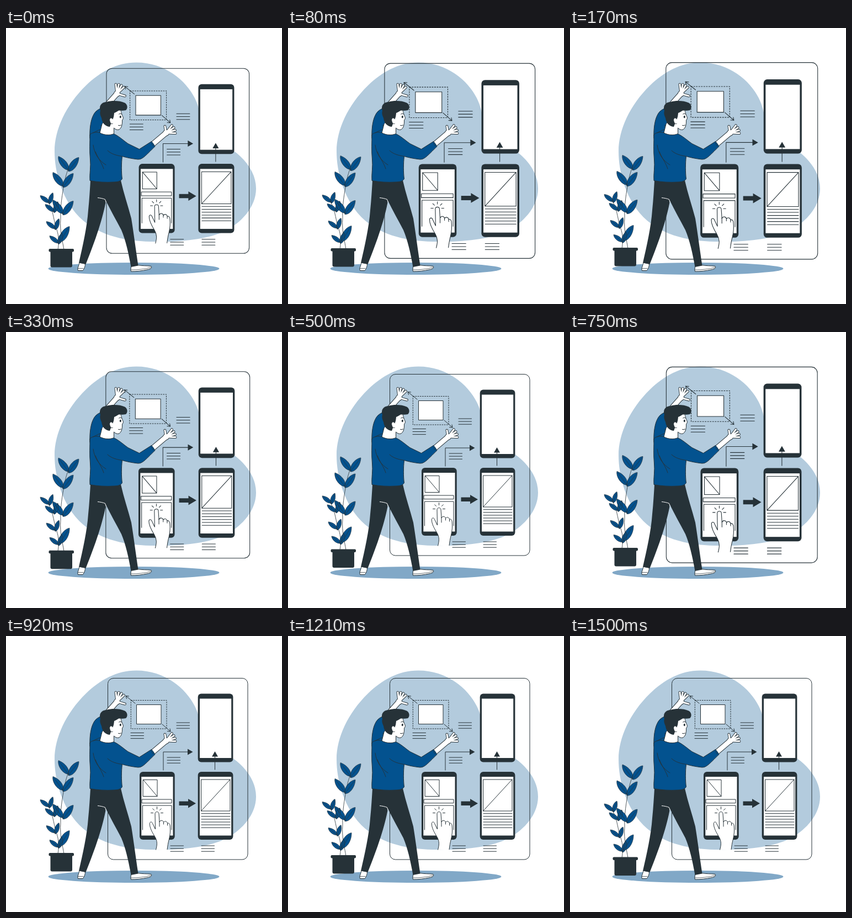
Animation, 500 px wide and 500 px high, one loop 1540 ms. Source, as an HTML page:

```html
<!DOCTYPE html>
<html lang="en">
<head>
<meta charset="utf-8">
<style>
  html, body { margin: 0; height: 100%; overflow: hidden; background: #fff; }
  svg { display: block; width: 100vw; height: 100vh; }
  .line { fill: none; stroke: #263238; stroke-linecap: round; stroke-linejoin: round; }
  .white { fill: #fff; stroke: #263238; stroke-linejoin: round; }
  .blue { fill: #03528f; stroke: #263238; stroke-linejoin: round; }
  .dark { fill: #263238; }
  .screen { fill: #fff; }
</style>
</head>
<body>
<svg viewBox="0 0 500 500">
  <path fill="#b3cbdd" d="M236 62.5C288 62.5 326 95 342 127C356 155 351 180 369 197C385 210 405 214 424 232C443 250 453 270 453 291C453 325 425 355 392 370C360 384 310 388 262 387C213 386 160 375 126 335C101 304 88 262 88 223C88 185 108 140 145 104C170 80 200 62.5 236 62.5Z"/>
  <ellipse cx="231.5" cy="436" rx="155" ry="11" fill="#81a8c7"/>

  <g id="board">
    <rect class="line" x="184.5" y="76.5" width="253.5" height="328.5" rx="10"/>
    <rect class="line" x="226.3" y="116.5" width="64.7" height="51.5" stroke-dasharray="2.6 1.6" style="stroke-linecap:butt"/>
    <rect class="white" x="236.5" y="124.5" width="44.5" height="35"/>
    <path class="line" d="M234 122L217 108.5M218.5 113.5L217 108.5L222.5 109M283 160L298 173M297 168L298 173L292.5 172.5"/>
    <path class="line" id="captions"/>
    <g id="phones"></g>
    <path class="line" d="M285 243V210H330M378.5 242V217"/>
    <path class="dark" d="M329 204.5L338.5 210L329 215.5ZM373 218.5L378.5 209L384 218.5ZM313.5 299.5H330V295L344 303.2L330 311.5V307H313.5Z"/>
    <path class="line" d="M248.5 260.5H274V290.5H248.5ZL274 290.5M246.5 296H300V302.7H246.5ZM247.5 351V307H300V351"/>
    <path class="line" d="M353.5 260H406V317H353.5ZL406 260M353.5 317L406 260" style="display:none"/>
    <path class="line" d="M353.5 317V260H406V317H353.5L406 260"/>
    <path class="line" id="rays"/>
    <path class="white" d="M271.5 387.5C274 378 274.5 372 270 364C265 356 260 347 260.3 339.5C261 336 264.3 336 265.5 339.5L270.5 350L270 322C270 317.3 277 317.3 277 322L278 337C280 332.7 285 333.7 285.5 337.5C288 334.5 292 335.5 292.5 339.5C295 338 297 340.5 297.2 344C298 352 297.5 360 295.5 368C293.5 375 293 380 292 387"/>
    <path class="line" d="M278 345V336M285.5 341V337M292.5 343V339.5"/>
  </g>

  <g id="plant">
    <path class="line" stroke-width=".8" d="M105 402C103 388 97 370 99 345C98 325 102 300 106 280C108 268 111 261 113 254M94 402C97 385 95 373 90 360C86 345 85 330 76 314"/>
    <path class="blue" id="leaves" stroke-width=".7"/>
    <rect class="dark" x="77.5" y="400.5" width="45.5" height="5.5" rx="2"/>
    <rect class="dark" x="80.5" y="402" width="39.5" height="32" rx="3"/>
  </g>

  <g id="man">
    <g id="hands"></g>
    <path class="blue" d="M152 200C151 180 154 160 163 151C167 147.5 171 145.5 174 145L180 195Z"/>
    <path class="white" d="M133 425L143.500 427C143.500 432 142 436 139 439.500H130.500C129 435 132 431 133 425ZM226.500 431L239 429.500C246 431 255 430.500 263 431.500C265 434.500 262 437 255 438C247 440 236 441 226.500 441C225 437 227 435 226.500 431Z"/>
    <path class="line" d="M130 435.500H140M226 438C238 438 252 437 263 433.500" stroke-width=".7"/>
    <path class="dark" d="M153 276H208C213 299 221 322 227 345C231 370 235 400 239.500 430.500L226.500 433C222 408 217 385 209 366C200 349 190 331 181 313C176 343 162 385 144.500 428L132 425.500C139 395 147 360 149 330C151 310 152 292 153 276Z"/>
    <path d="M166 307.500C171 308 176 309 179.500 310.500L181.500 316" fill="none" stroke="#fff"/>
    <path class="blue" d="M152 193C158 188 165 188 171 190C178 194 188 194 195 191.500C205 196 213 204 221 209.500L241.500 219.500L263.500 205.500C266 208 268 211 270 214.500C262 222 254 231 247.500 235.500Q243 238.500 239 238C229 237 219 235 210.500 232.500C209 245 209 262 210.500 273.500Q207 279 196 279C181 280 165 279 152 276.500C151 265 154 250 152.500 238C151 222 152 207 152 193Z"/>
    <path class="line" d="M158 212C160 228 168 240 181 248M162 224C167 237 173 243 177 255M184 222C190 228 200 231 210.500 232.500M263 208L267 214M172 176L174 186M158 190C165 186 169 184 173 184" stroke-width=".9"/>
    <path class="white" d="M184 158L207.500 147C209 154 210 157 212.300 162C213 164.500 211 166 210.500 167C211 175 209 182.500 204 184.300C200 185 197.500 183 195.500 181V191.500C188 195 178 194 170 190L174 174Z"/>
    <path class="dark" d="M171 150C168 142 172 134.500 182 134C192 131 206 131.500 215 135.500C220.500 138.500 221 146 217 149C212 150 208 149.500 204 149.500C201 152 198 153 196 154C195.500 159 195 163 192.500 167L188 179C180 178.500 174 172 173 163C170 157 170 153 171 150Z"/>
    <path class="white" d="M193 164.500C190 161 186.500 164 188 169C189 173 191.500 174.500 193.500 173" stroke="none"/>
    <path class="line" d="M204.500 156Q207 153.500 209.500 156M203.500 176.500Q206 177.500 208.500 176"/>
    <ellipse class="dark" cx="207.3" cy="161" rx="1.5" ry="2.2"/>
  </g>
</svg>
<script>
const PERIOD = 1540, CYCLE = 1500, STEP = 1000 / 24, LEAD = 30;
const $ = id => document.getElementById(id);
const setPath = (id, d) => $(id).setAttribute('d', d);
const repeat = (count, make) => Array.from({ length: count }, (_, i) => make(i)).join('');

const lines = (x, y, width, count) => repeat(count, i => `M${x} ${y + i * 5.1}h${width}`);

// Straight line at an angle in degrees, between two distances from a centre.
function spoke(x, y, angle, from, to) {
  const a = angle * Math.PI / 180, c = Math.cos(a), s = Math.sin(a);
  return `M${x + c * from} ${y + s * from}L${x + c * to} ${y + s * to}`;
}

const phone = (x, y, screenHeight) => `
  <rect class="dark" x="${x}" y="${y}" width="63.7" height="${screenHeight + 16.5}" rx="6"/>
  <rect class="screen" x="${x + 3.3}" y="${y + 9}" width="57.2" height="${screenHeight}"/>`;

// Forearm, palm, four fanned fingers and a thumb; a wide dark pass outlines the white one.
function hand(x, y, elbow, fan, thumb, reach) {
  const fingers = repeat(4, i => spoke(x, y, fan + i * 18, 0, 17)) + spoke(x, y, thumb, 0, reach);
  const pass = (color, edge) => [[fingers, 3], [`M${x} ${y}h0`, 10], [`M${x} ${y}L${elbow}`, 8.5]]
    .map(([d, w]) => `<path class="line" style="stroke:${color}" stroke-width="${w + edge}" d="${d}"/>`).join('');
  return pass('#263238', 1.8) + pass('#fff', 0);
}

// A pointed leaf with a vein; dx, dy lead from the stem to the tip.
function leaf(x, y, dx, dy) {
  const at = (along, across) => `${x + dx * along - dy * across} ${y + dy * along + dx * across}`;
  return `M${x} ${y}C${at(.15, .25)} ${at(.65, .24)} ${at(1, 0)}C${at(.8, -.22)} ${at(.25, -.27)} ${x} ${y}L${at(.9, 0)}`;
}
const pairs = (nodes, left, right) =>
  nodes.map(([x, y]) => leaf(x, y, ...left) + leaf(x, y + 2, ...right)).join('');

setPath('captions', [[226, 175.4], [309, 157], [292, 220], [298, 380], [354, 380]]
  .map(([x, y]) => lines(x, y, 23.5, 3)).join(''));
setPath('rays', repeat(5, i => spoke(273.5, 320.5, 180 + i * 45, 7, 11)));
$('phones').innerHTML = phone(347.7, 104.5, 107.5) + phone(242, 246, 106.5) +
  phone(347.7, 246, 106.5) + `<path class="line" d="${lines(354, 321.7, 52, 6)}"/>`;
setPath('leaves',
  pairs([[78, 317], [87, 333], [89, 364], [95, 390]], [-16, -13], [7, -20]) +
  pairs([[113, 258], [103, 287], [103, 337]], [-18, -25], [19, -25]) +
  leaf(97, 388, 18, -28));
$('hands').innerHTML = hand(201, 119, '177 146', -97, 16, 15) + hand(290, 190, '264 212', -52, -100, 12);

// Two linear beats of 10%, then a rest.
const peak = (p, start, top, end) =>
  Math.max(0, Math.min((p - start) / (top - start), (end - p) / (end - top)));
const beat = p => 1 + .1 * (peak(p, 0, .1, .3) + peak(p, .4, .5, .6));

function draw(now) {
  const step = Math.floor((now % PERIOD + 4) / STEP);
  const p = Math.min(1, (LEAD + step * STEP) / CYCLE);
  $('board').setAttribute('transform',
    `translate(311.25 240.75) scale(${beat(p)}) translate(-311.25 -240.75)`);
  $('plant').setAttribute('transform', `translate(0 ${-20 * Math.min(p, 1 - p)})`);
}

const start = performance.now();
function tick() {
  draw(performance.now() - start);
  requestAnimationFrame(tick);
}
tick();
</script>
</body>
</html>
```
